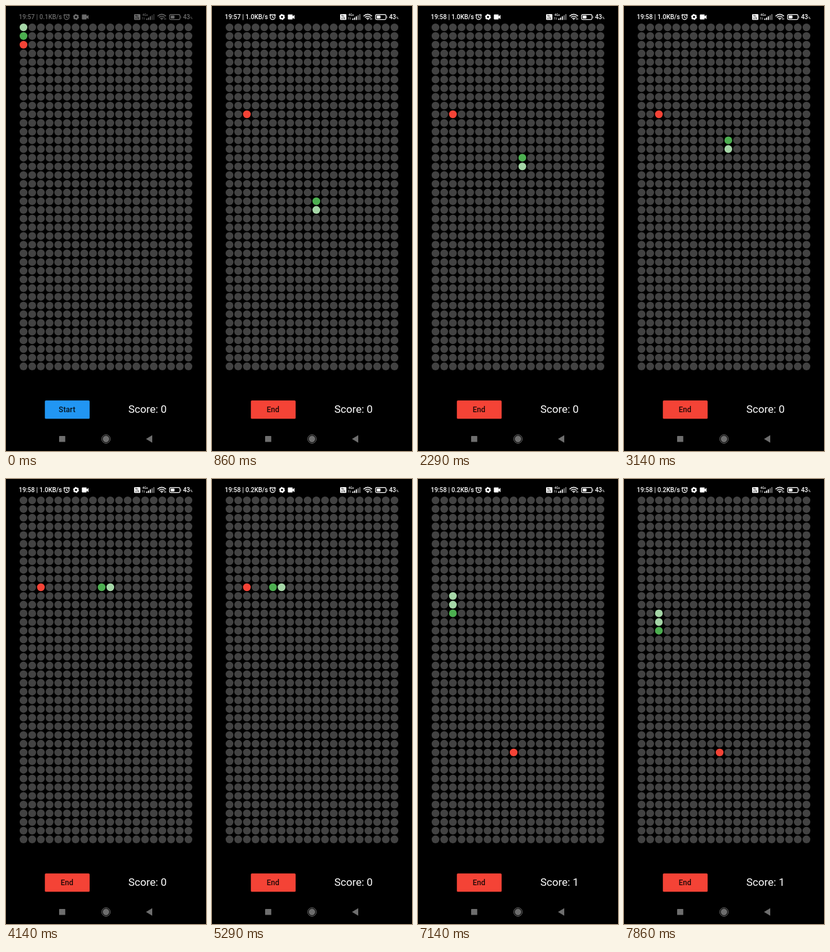
These frames come from a looping animation (320x711 px, 8000 ms). An HTML page:

```html
<!DOCTYPE html>
<html lang="en">
<head>
<meta charset="utf-8">
<title>Snake</title>
<style>
html, body { margin: 0; width: 100%; height: 100%; overflow: hidden; background: #000; }
svg { display: block; width: 320px; height: 711px; font-family: Roboto, sans-serif; }
.line { fill: none; stroke: #fff; }
#dots { fill: #424242; }
#dots .head { fill: #4caf50; }
#dots .body { fill: #a5d6a7; }
#dots .food { fill: #f44336; }
#status { fill: #fff; }
#nav { fill: #6e6e6e; }
</style>
</head>
<body>
<svg viewBox="0 0 320 711">
  <rect width="320" height="711"/>

  <g id="status">
    <text id="clock" x="20.6" y="21" font-size="10" font-weight="500"></text>

    <g class="line">
      <circle cx="97" cy="17.8" r="3.9" stroke-width="1.2"/>
      <path d="M97 15.4V18l1.8 1.2M91.9 15.2l2.5-2.2M102.1 15.2l-2.5-2.2" stroke-width="1.2"/>
    </g>
    <g class="line">
      <circle cx="112" cy="17.5" r="2.9" stroke-width="2.4"/>
      <circle cx="112" cy="17.5" r="4.2" stroke-width="1.1" stroke-dasharray="2.2 2.2"/>
    </g>
    <path d="M122.2 13.6h6q.8 0 .8.8v2l3-2.2v6.7l-3-2.2v1.9q0 .8-.8.8h-6q-.8 0-.8-.8v-6.2q0-.8.8-.8z"/>

    <rect x="205" y="13" width="10" height="9.2" rx="1.2"/>
    <g fill="#000" font-size="4.2" font-weight="500" text-anchor="middle">
      <text x="209.2" y="17.2">Vo</text>
      <text x="210" y="21.3">LTE</text>
    </g>
    <text x="218.3" y="16" font-size="5" font-weight="500">4G+</text>
    <path d="M218.6 21.8v-2.6h-.9l1.5-1.6v4.2zM221.5 18v2.5h.9l-1.5 1.5V18z" opacity=".85"/>
    <path d="M224.5 20h1.7v2.2h-1.7zM227.3 18.4h1.7v3.8h-1.7zM230.1 16.6h1.7v5.6h-1.7z"/>
    <path d="M232.9 14.8h1.7v7.4h-1.7zM235.7 13h1.7v9.2h-1.7z" opacity=".5"/>

    <g class="line" stroke-width="1.4">
      <path d="M242.4 16.2q6.8-5.8 13.6 0M244.6 18.3q4.6-3.8 9.2 0M246.8 20.3q2.4-1.9 4.8 0"/>
    </g>
    <path d="M247.8 21l1.4 1.4 1.4-1.4q-1.4-1-2.8 0z"/>
    <path d="M253.5 19.2v2.8M255.5 19.2v2.8" class="line" stroke-width=".8"/>

    <rect x="261.6" y="13.6" width="16.8" height="8" rx="2.2" class="line" stroke-width="1.1"/>
    <rect x="263.4" y="15.3" width="6.2" height="4.6" rx=".8"/>
    <path d="M279.6 15.6q1.6 2 0 4z"/>
    <text x="283.2" y="21" font-size="10" font-weight="500">43<tspan font-size="5.6">%</tspan></text>
  </g>

  <g id="dots"></g>

  <rect id="button" x="62.2" y="630.3" width="71.6" height="29.3" rx="1.6"/>
  <text id="label" x="97.7" y="649.4" font-size="12" font-weight="500" letter-spacing=".1"
    text-anchor="middle" fill="#000" fill-opacity=".87"></text>
  <text id="score" x="195.7" y="650.2" font-size="17.1" fill="#fff"></text>

  <g id="nav">
    <rect x="85" y="687" width="9.8" height="9.6" rx=".4"/>
    <circle cx="160" cy="691.8" r="5.2"/>
    <circle cx="160" cy="691.8" r="6.8" fill="none" stroke="#6e6e6e" stroke-width="1"/>
    <path d="M224 691.8l10-6v12z"/>
  </g>
</svg>

<script>
const COLS = 20, ROWS = 40, PITCH = 13.89, LEFT = 28.02, TOP = 34.1, RADIUS = 6.2;
const LOOP = 8000, SCREEN_STEP = 1000 / 7, STEPS = 56;
const START = 420, TICK = 300;
const MEAL = 20; // path index where the food is eaten

const $ = id => document.getElementById(id);
const cell = (col, row) => row * COLS + col;

const dots = Array.from({ length: COLS * ROWS }, (_, i) => {
  const dot = document.createElementNS("http://www.w3.org/2000/svg", "circle");
  dot.setAttribute("cx", LEFT + (i % COLS) * PITCH);
  dot.setAttribute("cy", TOP + Math.floor(i / COLS) * PITCH);
  dot.setAttribute("r", RADIUS);
  return $("dots").appendChild(dot);
});

// Up column 10, left along row 10, then down column 2.
function pathCell(i) {
  if (i <= 12) return cell(10, 22 - i);
  if (i <= MEAL) return cell(22 - i, 10);
  return cell(2, i - 10);
}

function gameAt(t) {
  if (t < START) return { snake: [cell(0, 1), cell(0, 0)], food: cell(0, 2), score: 0 };
  const head = Math.max(1, 4 + Math.floor((t - 1380) / TICK));
  const score = head >= MEAL ? 1 : 0;
  const snake = Array.from({ length: 2 + score }, (_, i) => pathCell(head - i));
  return { snake, food: score ? cell(9, 29) : cell(2, 10), score };
}

let painted = [];
function paint(i, name) {
  dots[i].setAttribute("class", name);
  painted.push(i);
}

function draw(t) {
  const { snake, food, score } = gameAt(t);
  const running = t >= START;

  painted.forEach(i => dots[i].removeAttribute("class"));
  painted = [];
  paint(food, "food");
  snake.forEach((i, n) => paint(i, n ? "body" : "head"));

  const minute = t < 2100 ? "19:57" : "19:58";
  const speed = t < 700 ? "0.1" : t < 4800 ? "1.0" : "0.2";
  $("clock").textContent = `${minute} | ${speed}KB/s`;
  $("status").setAttribute("opacity", Math.min(1, Math.max(0.42, t / START)));

  $("button").setAttribute("fill", running ? "#f44336" : "#2196f3");
  $("label").textContent = running ? "End" : "Start";
  $("score").textContent = "Score: " + score;
}

let shown = -1;
function frame() {
  const step = Math.floor((performance.now() % LOOP + 5) / SCREEN_STEP) % STEPS;
  if (step !== shown) draw(step * SCREEN_STEP);
  shown = step;
  requestAnimationFrame(frame);
}
frame();
</script>
</body>
</html>
```
